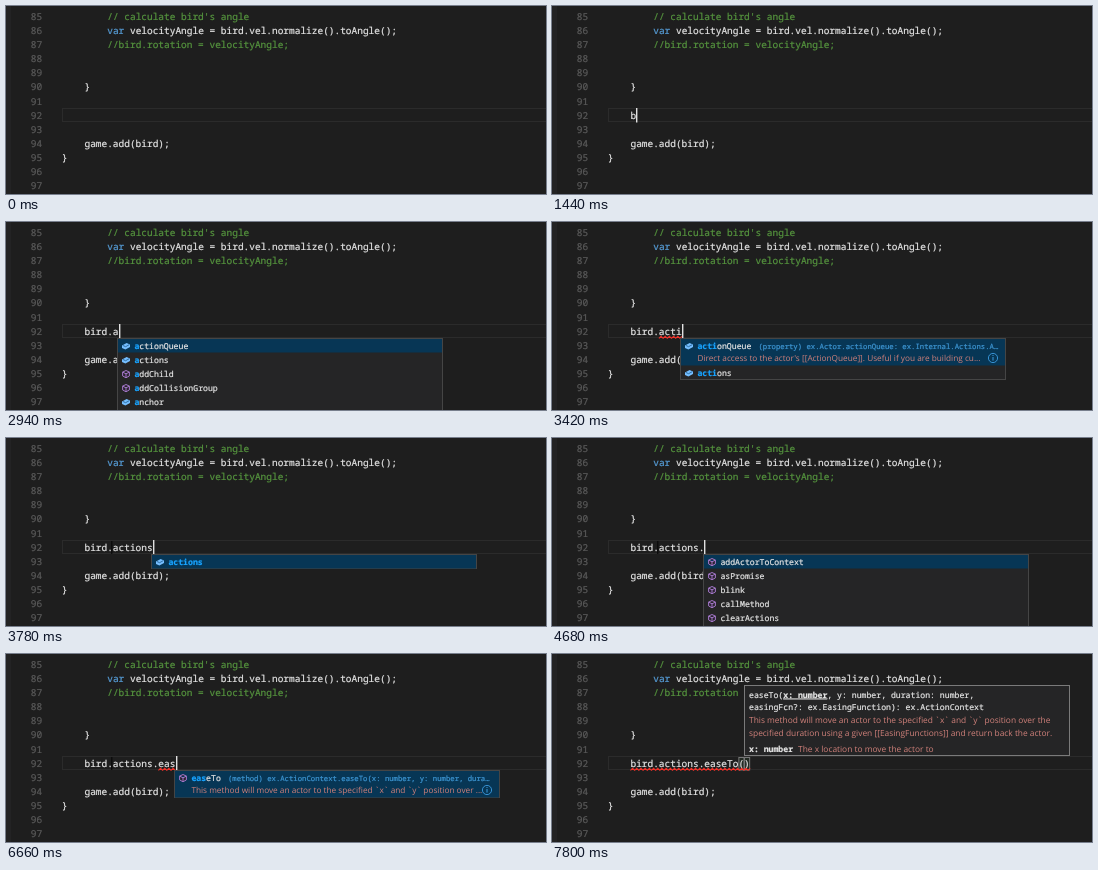
Write an HTML page that moves like this. It is 540 px wide and 188 px high and loops after 8000 ms.

```html
<!DOCTYPE html>
<html lang="en">
<head>
<meta charset="utf-8">
<title>Code completion</title>
<style>
html, body { margin: 0; width: 100%; height: 100%; overflow: hidden; background: #1e1e1e; }
svg { display: block; width: 540px; height: 188px; }
text { white-space: pre; text-rendering: geometricPrecision; fill: currentColor; }
.mono { font-family: "Noto Sans Mono", monospace; stroke: currentColor; stroke-width: .22px; }
.sans { font-family: "Open Sans", "Noto Sans", sans-serif; color: #d0807a; }
tspan { fill: currentColor; stroke: currentColor; }
.hit { color: #18a3ff; font-weight: 600; }
.b { font-weight: 700; }
</style>
</head>
<body>
<svg viewBox="0 0 540 188"><g id="page"></g><g id="live"></g></svg>
<script>
const LOOP = 8000, CH = 5.69, LEFT = 55.7, LINE = 14.08, TOP = 102;
const FG = '#e4e4e4', GREEN = '#55943e', BLUE = '#569cd6';
const colX = c => LEFT + (c + 4) * CH;
const baseline = n => 112.6 + (n - 92) * LINE;

// Every glyph of the mono face is 0.6 em wide.
const mono = (x, y, s, adv = CH, color = FG) =>
  `<text class="mono" x="${x}" y="${y}" font-size="${adv / 0.6}" color="${color}">${s}</text>`;
const sans = (x, y, s, size = 8.25) => `<text class="sans" x="${x}" y="${y}" font-size="${size}">${s}</text>`;
const rect = (x, y, w, h, fill, stroke = 'none') =>
  `<rect x="${x}" y="${y}" width="${w}" height="${h}" fill="${fill}" stroke="${stroke}"/>`;

const code = [
  [85, 4, GREEN, "// calculate bird's angle"],
  [86, 4, BLUE, 'var'],
  [86, 8, FG, 'velocityAngle = bird.vel.normalize().toAngle();'],
  [87, 4, GREEN, '//bird.rotation = velocityAngle;'],
  [90, 0, FG, '}'],
  [94, 0, FG, 'game.add(bird);'],
  [95, -4, FG, '}'],
];

function page() {
  let out = rect(0, 0, 5, 188, '#232324') + rect(56.5, 102.5, 490, 13, 'none', '#2b2b2b');
  for (let n = 85; n < 98; n++) out += mono(24.8, baseline(n), n, CH, '#5a5a5a');
  for (const [n, col, color, s] of code) out += mono(colX(col), baseline(n), s, CH, color);
  return out;
}

const cube = (x, y, fill, stroke) =>
  `<path d="M${x} ${y - 3.5}l3.4 1.6v3.8l-3.4 1.9l-3.4-1.9v-3.8zM${x - 3.4} ${y - 1.9}l3.4 1.7l3.4-1.7M${x} ${y - 0.2}v3.8" fill="${fill}" stroke="${stroke}"/>`;
const icons = {
  m: (x, y) => cube(x, y, '#2b2431', '#a477c9'),
  v: (x, y) => `<path d="M${x - 4} ${y - 0.5}l4.6-2.6l3.4 1.5v2.6l-4.6 2.6l-3.4-1.6z" fill="#75beff"/>` +
    `<path d="M${x - 3} ${y - 0.5}l2.6 1.2l3.6-2" fill="none" stroke="#1d5b8c" stroke-width=".8"/>`,
  i: (x, y) => `<path d="M${x - 2} ${y}h4" stroke="#75beff"/><circle cx="${x - 3}" cy="${y}" r="1.3" fill="#75beff"/>` +
    `<circle cx="${x + 2.2}" cy="${y}" r="2.1" fill="none" stroke="#75beff" stroke-width="1.2"/>`,
};

const lists = {
  b: 'i:BarProp i:BeforeUnloadEvent i:BiquadFilterNode v:bird i:Blob',
  bi: 'i:BiquadFilterNode v:bird i:IDBIndex i:IDBIndexParameters m:launchBird',
  dot: 'v:actionQueue v:actions m:addChild m:addCollisionGroup m:addDrawing',
  a: 'v:actionQueue v:actions m:addChild m:addCollisionGroup v:anchor',
  acti: 'v:actionQueue v:actions',
  actions: 'v:actions',
  ctx: 'm:addActorToContext m:asPromise m:blink m:callMethod m:clearActions',
  e: 'm:easeTo m:fade m:meet m:moveBy m:moveTo',
  ea: 'm:easeTo m:repeat m:repeatForever',
  eas: 'm:easeTo',
};
const infos = {
  bird: '(local var) bird: ex.Actor',
  actionQueue: '(property) ex.Actor.actionQueue: ex.Internal.Actions.ActionQueue',
  actions: '(property) ex.Actor.actions: ex.ActionContext',
  addActorToContext: '(method) ex.ActionContext.addActorToContext(actor: ex.Actor): void',
  easeTo: '(method) ex.ActionContext.easeTo(x: number, y: number, duration: number)',
};
const docs = {
  actionQueue: "Direct access to the actor's [[ActionQueue]]. Useful if you are building cu...",
  actions: '[[ActionContext|Action context]] of the actor. Useful for scripting act...',
  easeTo: 'This method will move an actor to the specified `x` and `y` position over ...',
};

function label(name, query) {
  const at = query ? name.toLowerCase().indexOf(query) : -1;
  if (at < 0) return name;
  const end = at + query.length;
  return `${name.slice(0, at)}<tspan class="hit">${name.slice(at, end)}</tspan>${name.slice(end)}`;
}

function popup({ col, list, query = '', sel = 0, info = false, thumb }) {
  const x = Math.round(colX(col) - 1.4), textX = x + 17.4, adv = 4.91, infoAdv = 4.37;
  const items = lists[list].split(' ').map(s => s.split(':'));
  const rowH = i => info && i === sel && docs[items[i][1]] ? 27 : 14;
  const total = items.reduce((h, _, i) => h + rowH(i), 0);
  let out = rect(x + 0.5, 116.5, 325, items.length > 4 ? 90 : total, '#252526', '#454545');
  let y = 117;
  items.forEach(([kind, name], i) => {
    const h = rowH(i);
    if (i === sel) out += rect(x + 1, y, 324, h - 0.5, '#073655');
    out += icons[kind](x + 9, y + 7) + mono(textX, y + 10, label(name, query), adv);
    if (info && i === sel) {
      const off = 18 + name.length * adv + 6.5, room = Math.floor((320 - off) / infoAdv);
      const s = infos[name];
      out += mono(x + off, y + 10, s.length > room ? s.slice(0, room - 1) + '…' : s, infoAdv, '#3d95d2');
      if (h > 14) out += sans(textX, y + 21.8, docs[name]) +
        `<g stroke="#3b9be0" fill="none"><circle cx="${x + 313}" cy="${y + 19}" r="4.6" stroke-width=".9"/>` +
        `<path d="M${x + 313} ${y + 18}v3.6M${x + 313} ${y + 16}v1"/></g>`;
    }
    y += h;
  });
  if (thumb) out += rect(x + 317, thumb, 8, 40, '#4f4f50');
  return out;
}

function squiggle(from, to) {
  const x = colX(from), n = Math.round((to - from) * CH / 2.1);
  let d = `M${x} 116.3`;
  for (let i = 1; i <= n; i++) d += `l2.1 ${i % 2 ? -2 : 2}`;
  return `<path d="${d}" fill="none" stroke="#f0332b" stroke-width="1.1"/>`;
}

function signature() {
  return rect(192.5, 31.5, 325, 70, '#252526', '#7a7a7a') +
    mono(197, 43.5, 'easeTo(<tspan class="b" text-decoration="underline">x: number</tspan>, y: number, duration: number,', 4.9) +
    mono(197, 56.3, 'easingFcn?: ex.EasingFunction): ex.ActionContext', 4.9) +
    sans(197, 69.3, 'This method will move an actor to the specified `x` and `y` position over the', 8.4) +
    sans(197, 82.3, 'specified duration using a given [[EasingFunctions]] and return back the actor.', 8.4) +
    mono(197, 97.5, '<tspan class="b">x: number</tspan>', 4.9) +
    sans(246, 97.5, 'The x location to move the actor to', 8.4);
}

// Each step changes some fields of the editor state.
const pop = (col, list, query, sel, info, thumb) => ({ col, list, query, sel, info, thumb });
const steps = [
  [0, { text: '', caret: 0, pop: null, err: null, beam: 0, sig: 0 }],
  [900, { caret: 1 }],
  [1380, { caret: 0 }],
  [1440, { text: 'b', caret: 1 }],
  [1500, { pop: pop(1, 'b', 'b', 3) }],
  [1620, { err: [0, 1] }],
  [1680, { pop: pop(1, 'b', 'b', 3, 1) }],
  [1920, { caret: 0 }],
  [2100, { text: 'bi', caret: 1 }],
  [2160, { pop: pop(2, 'bi', 'bi', 1) }],
  [2220, { err: [0, 2] }],
  [2280, { pop: pop(2, 'bi', 'bi', 1, 1) }],
  [2460, { text: 'bird', pop: null, err: null }],
  [2700, { text: 'bird.' }],
  [2760, { pop: pop(5, 'dot') }],
  [2880, { text: 'bird.a' }],
  [2940, { pop: pop(6, 'a', 'a') }],
  [3000, { text: 'bird.ac' }],
  [3060, { pop: pop(7, 'acti', 'ac') }],
  [3120, { text: 'bird.act' }],
  [3180, { pop: pop(8, 'acti', 'act') }],
  [3240, { text: 'bird.acti' }],
  [3300, { pop: pop(9, 'acti', 'acti') }],
  [3360, { err: [5, 9] }],
  [3420, { pop: pop(9, 'acti', 'acti', 0, 1) }],
  [3480, { text: 'bird.actio', pop: pop(10, 'acti', 'actio') }],
  [3540, { text: 'bird.action', err: [5, 10] }],
  [3600, { text: 'bird.actions', pop: pop(11, 'acti', 'action') }],
  [3660, { pop: pop(12, 'actions', 'actions') }],
  [3780, { err: null, beam: 1 }],
  [4080, { caret: 0 }],
  [4140, { pop: pop(12, 'actions', 'actions', 0, 1) }],
  [4560, { text: 'bird.actions.', caret: 1, pop: null }],
  [4620, { pop: pop(13, 'ctx') }],
  [5160, { caret: 0 }],
  [5220, { pop: pop(13, 'ctx', '', 0, 1) }],
  [5520, { text: 'bird.actions.e', caret: 1 }],
  [5580, { pop: pop(14, 'e', 'e', 0, 0, 175) }],
  [6000, { caret: 0 }],
  [6060, { caret: 1 }],
  [6180, { text: 'bird.actions.ea' }],
  [6240, { pop: pop(15, 'ea', 'ea') }],
  [6360, { text: 'bird.actions.eas' }],
  [6420, { pop: pop(16, 'eas', 'eas') }],
  [6540, { err: [13, 16] }],
  [6660, { pop: pop(16, 'eas', 'eas', 0, 1) }],
  [6900, { text: 'bird.actions.easeTo', pop: null, err: null }],
  [7320, { text: 'bird.actions.easeTo()' }],
  [7500, { sig: 1, err: [0, 21], beam: 0 }],
  [7800, { caret: 0 }],
];
let last = {};
const states = steps.map(([, change]) => (last = { ...last, ...change }));

function live({ text, caret, pop, err, beam, sig }) {
  const parens = text.endsWith(')');
  let out = '';
  if (parens) for (const c of [19, 20])
    out += rect(colX(c) + 0.3, TOP + 1.5, CH - 0.6, 12.5, '#222a22', '#777');
  out += mono(colX(0), baseline(92), text);
  if (beam) out += rect(105.3, TOP + 1, 1, 13, '#050505');
  if (err) out += squiggle(...err);
  if (caret) out += rect(Math.round(colX(text.length - parens)), TOP, 1.4, 14.5, '#e0e0e0');
  if (pop) out += popup(pop);
  if (sig) out += signature();
  return out;
}

const layer = document.getElementById('live');
document.getElementById('page').innerHTML = page();
let shown = -1;
function draw() {
  const t = performance.now() % LOOP;
  let i = steps.length - 1;
  while (steps[i][0] > t) i--;
  if (i !== shown) layer.innerHTML = live(states[shown = i]);
  requestAnimationFrame(draw);
}
draw();
</script>
</body>
</html>
```
